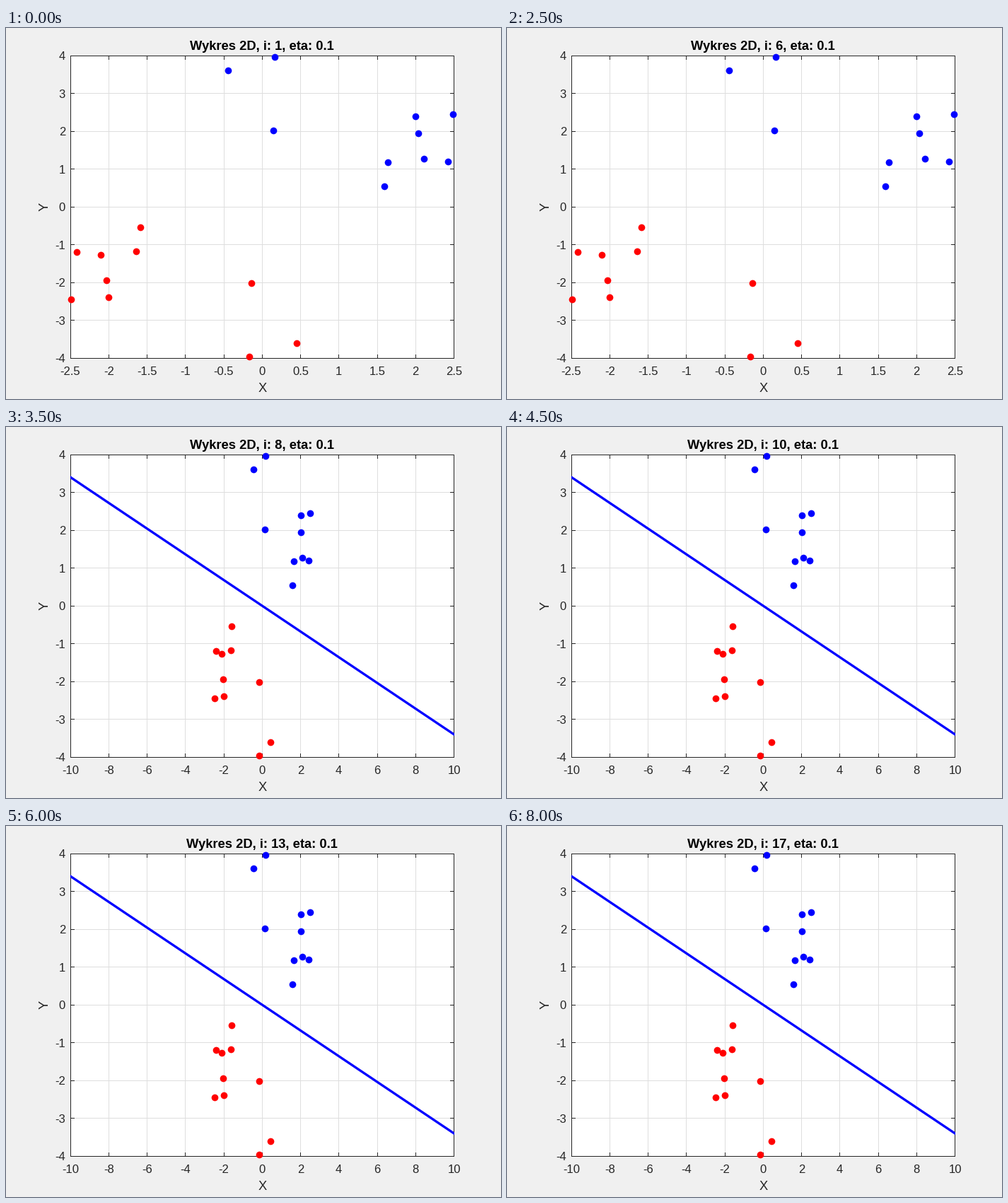
A matplotlib script that plays this animation: 700x525 px, repeating every 8.5 s.

```python
import numpy as np
import matplotlib.pyplot as plt
from matplotlib.animation import FuncAnimation
from matplotlib.patches import Rectangle

W, H, PT = 700, 525, 0.72          # stage in pixels, points per pixel
LEFT, RIGHT, TOP, BOTTOM = 91, 633.5, 39, 467
MID = (LEFT + RIGHT) / 2
INK, GRID = "#262626", "#dedede"

plt.rcParams["font.family"] = "Liberation Sans"
plt.rcParams["axes.unicode_minus"] = False

# the red class mirrors the blue one through the origin
BLUE = np.array([
    (0.168, 3.97), (-0.445, 3.61), (0.145, 2.02), (2.0, 2.385), (2.03, 1.945),
    (2.49, 2.455), (1.64, 1.18), (2.105, 1.275), (2.42, 1.195), (1.59, 0.545),
])

fig = plt.figure(figsize=(W / 100, H / 100), dpi=100, facecolor="#f0f0f0")
ax = fig.add_axes([0, 0, 1, 1])


def stage(i):
    """Limits, tick steps and boundary (slope, intercept) of an iteration."""
    if i < 7:
        return (-2.5, 2.5, 0.5), (-4, 4, 1), None
    if i == 7:
        return (-10, 10, 2), (-16, 4, 2), (-0.8375, -6.62)
    return (-10, 10, 2), (-4, 4, 1), (-0.3402, 0.0)


def ticks(lo, hi, step):
    return np.linspace(lo, hi, round((hi - lo) / step) + 1)


def rule(x, y, color):
    """One-pixel line through the centres of the pixels it falls in."""
    x, y = (np.floor(np.array(v) + 1e-6) + 0.5 for v in (x, y))
    ax.plot(x, y, color=color, lw=PT, solid_capstyle="projecting",
            solid_joinstyle="miter", snap=False)


def label(x, y, text, size, ha="center", va="baseline", **kw):
    ax.text(x, y, text, fontsize=size * PT, ha=ha, va=va, **kw)


def draw(n):
    i = n + 1
    xr, yr, boundary = stage(i)

    def px(x):
        return LEFT + (x - xr[0]) / (xr[1] - xr[0]) * (RIGHT - LEFT)

    def py(y):
        return BOTTOM - (y - yr[0]) / (yr[1] - yr[0]) * (BOTTOM - TOP)

    ax.clear()
    ax.set(xlim=(0, W), ylim=(H, 0))
    ax.axis("off")
    box = Rectangle((LEFT, TOP), RIGHT - LEFT, BOTTOM - TOP, fc="white", ec="none")
    ax.add_patch(box)

    xt, yt = ticks(*xr), ticks(*yr)
    for x in px(xt):
        rule([x, x], [TOP, BOTTOM], GRID)
    for y in py(yt):
        rule([LEFT, RIGHT], [y, y], GRID)

    for v in xt:
        x = px(v)
        rule([x, x], [BOTTOM, BOTTOM - 5], INK)
        rule([x, x], [TOP, TOP + 5], INK)
        label(x, 491, f"{v:g}", 16.67, color=INK)
    for v in yt:
        y = py(v)
        rule([LEFT, LEFT + 5], [y, y], INK)
        rule([RIGHT, RIGHT - 5], [y, y], INK)
        label(84, y + 6.3, f"{v:g}", 16.67, ha="right", color=INK)
    rule([LEFT, RIGHT, RIGHT, LEFT, LEFT], [TOP, TOP, BOTTOM, BOTTOM, TOP], INK)

    for points, color in ((BLUE, "#0000ff"), (-BLUE, "#ff0000")):
        ax.plot(px(points[:, 0]), py(points[:, 1]), "o", color=color,
                ms=9.7 * PT, mew=0)

    if boundary:
        x = np.array([xr[0] - 1, xr[1] + 1])
        line, = ax.plot(px(x), py(boundary[0] * x + boundary[1]),
                        color="#0000ff", lw=3.33 * PT)
        line.set_clip_path(box)

    label(MID - 0.25, 31, f"Wykres 2D, i: {i}, eta: 0.1", 18.33, weight="bold",
          color="black")
    label(MID + 0.5, 515, "X", 18.33, color=INK)
    label(45 if i == 7 else 55, 253, "Y", 18.33, va="center", rotation=90,
          color=INK)
    return []


anim = FuncAnimation(fig, draw, frames=17, interval=500, init_func=lambda: [],
                     repeat=True, repeat_delay=0)
plt.show()
```
